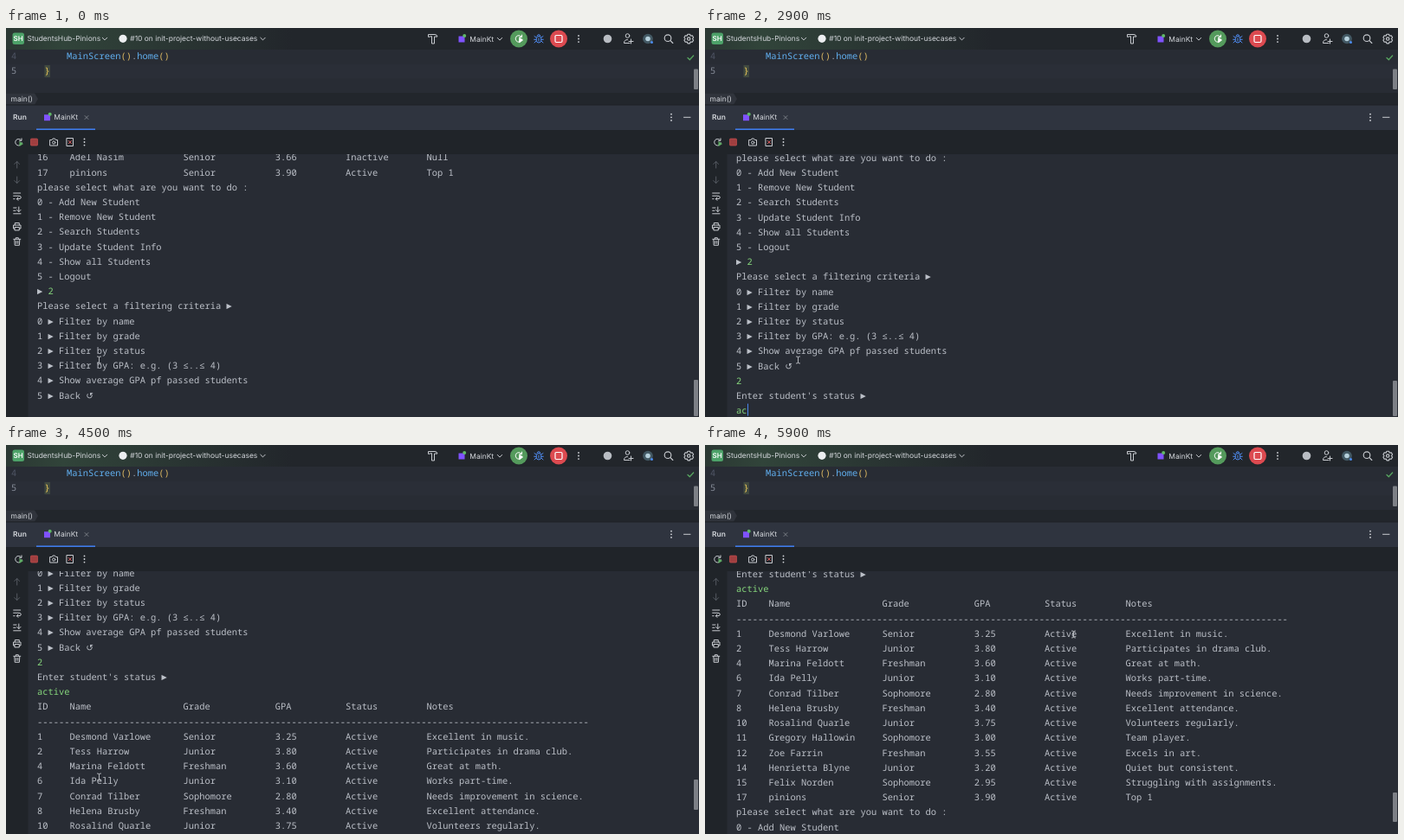
Recreate the animation shown at these times as an HTML page. Size 800 px wide and 450 px high, loop 6000 ms.

```html
<!DOCTYPE html>
<html lang="en">
<head>
<meta charset="utf-8">
<title>Student console</title>
<style>
html, body { margin: 0; width: 800px; height: 450px; overflow: hidden; background: #282c34; }
body { position: relative; text-rendering: geometricPrecision; }
svg, #console, #console * { position: absolute; }
svg { left: 0; top: 0; font: 8.45px Inter, sans-serif; fill: #d5d8dd; }
pre, .code { font: 10.417px/17.2px "Noto Sans Mono", "DejaVu Sans Mono", monospace; font-variant-ligatures: none; }
.icon { fill: none; stroke: #c8cbd0; stroke-width: 1; stroke-linecap: round; stroke-linejoin: round; }
#console { left: 26px; top: 146px; width: 774px; height: 304px; overflow: hidden; }
#page { left: 10px; top: -3.6px; }
pre { margin: 0; color: #bcc0c8; white-space: pre; }
#console pre b { position: static; font-weight: 400; color: #86d67c; }
#console pre i { position: static; font: 10.4px/1 "DejaVu Sans", sans-serif; }
#caret { width: 1.6px; height: 14px; background: #4a86f0; }
#thumb { right: 1px; width: 5px; border-radius: 1px; background: #7d8086; }
</style>
</head>
<body>
<div id="console">
  <div id="page"><pre id="log"></pre><div id="caret"></div></div>
  <div id="thumb"></div>
</div>

<svg width="800" height="450" viewBox="0 0 800 450">
  <defs>
    <linearGradient id="glow">
      <stop offset="0" stop-color="#2b3833"/><stop offset=".2" stop-color="#31443a"/>
      <stop offset="1" stop-color="#22262b"/>
    </linearGradient>
    <path id="chevron" class="icon" d="M-2.7-1.3 0 1.4 2.7-1.3"/>
    <g id="dots"><circle cy="-3.6" r=".9"/><circle r=".9"/><circle cy="3.6" r=".9"/></g>
    <path id="rerun" d="M3.2-2A3.8 3.8 0 1 0 3.8.8M3.5-4.2V-1.7H1"/>
    <g id="running"><rect x="-3.5" y="-3" width="7" height="7" fill="#7f52ff"/><circle cx="3.2" cy="-3.4" r="2" fill="#5fb865"/></g>
  </defs>

  <!-- Main toolbar -->
  <rect width="800" height="25" fill="#22262b"/>
  <rect width="330" height="25" fill="url(#glow)"/>
  <rect x="7.5" y="5.5" width="13.5" height="13.5" rx="2.5" fill="#4da269"/>
  <text x="14.2" y="15.4" text-anchor="middle" font-size="8" font-weight="600" fill="#fff">SH</text>
  <text x="24.5" y="15.3">StudentsHub-Pinions</text>
  <use href="#chevron" x="114" y="12.5"/>
  <circle cx="135" cy="12.3" r="4.6" fill="#eceef0"/>
  <text x="143.3" y="15.3">#10 on init-project-without-usecases</text>
  <use href="#chevron" x="296.5" y="12.5"/>
  <path class="icon" d="M487.5 10V7.5H495Q497.5 7.5 498 10H494.5V18H491.5V10Z"/>
  <use href="#running" x="526" y="12.5"/>
  <text x="535.3" y="15.5">MainKt</text>
  <use href="#chevron" x="570" y="12.7"/>
  <circle cx="592" cy="12.5" r="10" fill="#549a5c"/>
  <g class="icon" style="stroke:#fff"><use href="#rerun" x="592" y="12.3"/><path d="M593 11.5 596.5 14 593 16.5Z" fill="#fff"/></g>
  <g class="icon" style="stroke:#4f8bf0">
    <rect x="612.3" y="9.5" width="5.4" height="7.5" rx="2.7"/>
    <path d="M613 9Q615 6 617 9M612 11 610 9.5M612 13.3H609.7M612 15 610 17M618 11 620 9.5M618 13.3H620.3M618 15 620 17M615 12V15"/>
  </g>
  <circle cx="638" cy="12.5" r="10" fill="#dc4a50"/>
  <rect x="634" y="8.5" width="8" height="8" rx="1.2" class="icon" style="stroke:#fff;stroke-width:1.2"/>
  <use href="#dots" x="661" y="12.5"/>
  <circle cx="694.5" cy="12.5" r="4.8" fill="#b9bdc3"/>
  <g class="icon">
    <circle cx="717.5" cy="9" r="2.3"/><path d="M720 17.5H713.5Q713.5 13.5 717.5 13.5M721.5 13V18M719 15.5H724"/>
  </g>
  <circle cx="741" cy="12.5" r="5.8" fill="#435964"/><circle cx="741" cy="12.5" r="2.8" fill="#b5d0dc"/>
  <circle cx="745.5" cy="16.5" r="1.5" fill="#4d8df0"/>
  <g class="icon" style="stroke-width:1.15">
    <circle cx="764" cy="11.7" r="3.8"/><path d="M767 14.7 769.8 17.5"/>
    <path d="M787 7.2H789.5L790.3 9 792.3 8.8 793.6 11 792.4 12.5 793.6 14 792.3 16.2 790.3 16 789.5 17.8H787L786.2 16 784.2 16.2 782.9 14 784.1 12.5 782.9 11 784.2 8.8 786.2 9Z"/>
    <circle cx="788.2" cy="12.5" r="1.7"/>
  </g>

  <!-- Editor -->
  <rect y="25" width="800" height="50" fill="#282c34"/>
  <rect y="42" width="800" height="16.5" fill="#2a2e37"/>
  <rect x="44.5" y="43" width="6.4" height="14" fill="#414a40"/>
  <g class="code" fill="#4f5665">
    <text x="6" y="36.2">4</text><text x="6" y="53.4" fill="#858b97">5</text>
    <text x="70" y="36.2" fill="#61afef">MainScreen<tspan fill="#dcb862">()</tspan><tspan fill="#abb2bf">.</tspan>home<tspan fill="#dcb862">()</tspan></text>
    <text x="44.5" y="53.4" fill="#e8c558">}</text>
  </g>
  <path class="icon" style="stroke:#58a660;stroke-width:1.3" d="M787 34.5 789.3 36.8 793.6 32"/>
  <rect x="794" y="47.5" width="5" height="23.5" rx="1" fill="#7d8086"/>

  <!-- Breadcrumb and tool window header -->
  <rect y="75" width="800" height="14" fill="#22262c"/>
  <path d="M0 75.5H33L37 82 33 88.5H0Z" fill="#30343c"/>
  <text x="5.5" y="84.8">main()</text>
  <rect y="89" width="800" height="29" fill="#2f343f"/>
  <path d="M0 89H800" stroke="#1e2126"/>
  <text x="8" y="106.4" font-weight="600">Run</text>
  <use href="#running" x="47.5" y="103.2"/>
  <text x="55.3" y="106.4">MainKt</text>
  <path class="icon" style="stroke:#8a8e95;stroke-width:.8" d="M91 101.5 95 105.5M95 101.5 91 105.5"/>
  <use href="#dots" x="768" y="103.3"/>
  <path class="icon" d="M782.5 103.3H790"/>
  <rect y="118" width="800" height="28" fill="#202429"/>
  <rect x="35" y="116.4" width="68" height="1.6" fill="#3f7bea"/>

  <!-- Run toolbar -->
  <use href="#rerun" x="14.5" y="132" class="icon"/>
  <path d="M15.5 131 20 134 15.5 137Z" fill="#5fad65"/>
  <rect x="28.5" y="128" width="8" height="8" rx="1" fill="#a03f40" stroke="#c84f50" stroke-width=".7"/>
  <g class="icon">
    <path d="M51 129.5H53L54 128H56.5L57.5 129.5H59.5V136H51Z"/><circle cx="55.2" cy="132.5" r="1.6"/>
    <path d="M70.3 127.5H77.5V136.5H70.3Z"/><path d="M72.3 130.5 75.5 133.7M75.5 130.5 72.3 133.7" stroke="#db5c5c"/>
  </g>
  <use href="#dots" x="90.5" y="132"/>

  <!-- Side strip -->
  <rect y="146" width="25.5" height="304" fill="#202429"/>
  <g class="icon">
    <path stroke="#555a62" d="M12.7 162V154.5M9.8 157.4 12.7 154.5 15.6 157.4M12.7 172V179.5M9.8 176.6 12.7 179.5 15.6 176.6"/>
    <path d="M8.7 191H16.7M8.7 194.2H15Q17.3 194.2 17.3 196 17.3 197.7 15 197.7H12.5M14 196 12.3 197.7 14 199.4M8.7 197.7H10"/>
    <path d="M8.7 208H12M8.7 211.3H11M8.7 214.8H17M14.8 207V212.5M12.6 210.4 14.8 212.6 17 210.4"/>
    <path d="M10.3 228V225.5H15.3V228M10 232H8.5V228H17V232H15.5M10.3 230.5H15.3V234H10.3Z"/>
    <path d="M8.8 244.3H16.8M11.3 244V242.7H14.3V244M9.8 244.5 10.2 251.3H15.4L15.8 244.5M11.8 246.5V249.3M13.8 246.5V249.3"/>
  </g>

  <path id="pointer" class="icon" style="stroke:#b4b7bc" d="M-2-4Q0-4 0-3Q0-4 2-4M0-3V3M-2 4Q0 4 0 3Q0 4 2 4"/>
</svg>

<script>
const LOOP = 6000, STEP = 100, LINE = 17.2, CHAR = 6.25, VIEW = 304;
const $ = id => document.getElementById(id);

const row = (...cells) => cells.map((cell, i) => cell.padEnd([6, 21, 17, 13, 15, 0][i])).join('');
const active = (id, name, grade, gpa, notes) => row(id, name, grade, gpa, 'Active', notes);
const input = text => `<b>${text}</b>`;

const menu = ['please select what are you want to do :', '0 - Add New Student', '1 - Remove New Student',
  '2 - Search Students', '3 - Update Student Info', '4 - Show all Students', '5 - Logout'];
const filters = ['Please select a filtering criteria ►', '0 ► Filter by name', '1 ► Filter by grade',
  '2 ► Filter by status', '3 ► Filter by GPA: e.g. (3 ≤..≤ 4)',
  '4 ► Show average GPA pf passed students', '5 ► Back <i>↺</i>'];
const results = [
  row('ID', 'Name', 'Grade', 'GPA', 'Status', 'Notes'),
  '-'.repeat(102),
  active('1', 'Desmond Varlowe', 'Senior', '3.25', 'Excellent in music.'),
  active('2', 'Tess Harrow', 'Junior', '3.80', 'Participates in drama club.'),
  active('4', 'Marina Feldott', 'Freshman', '3.60', 'Great at math.'),
  active('6', 'Ida Pelly', 'Junior', '3.10', 'Works part-time.'),
  active('7', 'Conrad Tilber', 'Sophomore', '2.80', 'Needs improvement in science.'),
  active('8', 'Helena Brusby', 'Freshman', '3.40', 'Excellent attendance.'),
  active('10', 'Rosalind Quarle', 'Junior', '3.75', 'Volunteers regularly.'),
  active('11', 'Gregory Hallowin', 'Sophomore', '3.00', 'Team player.'),
  active('12', 'Zoe Farrin', 'Freshman', '3.55', 'Excels in art.'),
  active('14', 'Henrietta Blyne', 'Junior', '3.20', 'Quiet but consistent.'),
  active('15', 'Felix Norden', 'Sophomore', '2.95', 'Struggling with assignments.'),
  active('17', 'pinions', 'Senior', '3.90', 'Top 1')];

const CHOICE_LINE = 17, STATUS_LINE = 19, PROMPT_LINE = 41;
const CHOICE_TYPED = 1100, CHOICE_SENT = 1600, STATUS_SENT = 4300, OUTPUT_DONE = 4500;
const statusKeys = [2600, 2900, 3100, 3300, 3500, 3700];

const scrollKeys = [[4200, 2 * LINE], [4300, 93], [4500, 190.6], [4800, 345], [5000, 24 * LINE],
  [5600, 24 * LINE], [5900, 18 * LINE]];
const pointerX = [[4900, 107.5], [5400, 294], [5700, 425.5]];
const pointerY = [[4900, 384], [5400, 265], [5700, 219]];

function track(keys, t) {
  const next = keys.findIndex(key => key[0] > t);
  if (next < 0) return keys[keys.length - 1][1];
  if (!next) return keys[0][1];
  const [t0, a] = keys[next - 1], [t1, b] = keys[next];
  return a + (b - a) * (t - t0) / (t1 - t0);
}

function render(t) {
  const choice = t >= CHOICE_TYPED ? '2' : '';
  const status = 'active'.slice(0, statusKeys.filter(key => key <= t).length);
  $('log').innerHTML = [
    row('16', 'Adel Nasim', 'Senior', '3.66', 'Inactive', 'Null'),
    row('17', 'pinions', 'Senior', '3.90', 'Active', 'Top 1'),
    ...menu, '► ' + input(2), ...filters, input(choice),
    "Enter student's status ►", input(status), ...results, ...menu, '►'].join('\n');

  const scroll = t < CHOICE_SENT ? 0 : track(scrollKeys, t);
  $('page').style.transform = `translateY(${-scroll}px)`;

  const [line, column] = t < CHOICE_SENT ? [CHOICE_LINE, choice.length]
    : t < STATUS_SENT ? [STATUS_LINE, status.length] : [PROMPT_LINE, 2];
  const edits = [-600, CHOICE_TYPED, CHOICE_SENT, ...statusKeys, OUTPUT_DONE];
  const lastEdit = Math.max(...edits.filter(edit => edit <= t));
  const caret = $('caret').style;
  caret.left = column * CHAR + 'px';
  caret.top = line * LINE + 'px';
  caret.visibility = (t - lastEdit) % 1000 < 500 ? 'visible' : 'hidden';

  const added = t < CHOICE_SENT ? 0 : t < STATUS_SENT ? 2 * LINE : t < STATUS_SENT + STEP ? 133 : 24 * LINE;
  const total = 2067 + added;
  $('thumb').style.top = 2 + (1763 + scroll) * VIEW / total + 'px';
  $('thumb').style.height = VIEW * VIEW / total - 3 + 'px';

  $('pointer').setAttribute('transform', `translate(${track(pointerX, t)} ${track(pointerY, t)})`);
}

let shown = -1;
function tick() {
  const t = Math.floor(performance.now() % LOOP / STEP) * STEP;
  if (t !== shown) render(shown = t);
  requestAnimationFrame(tick);
}
tick();
</script>
</body>
</html>
```
